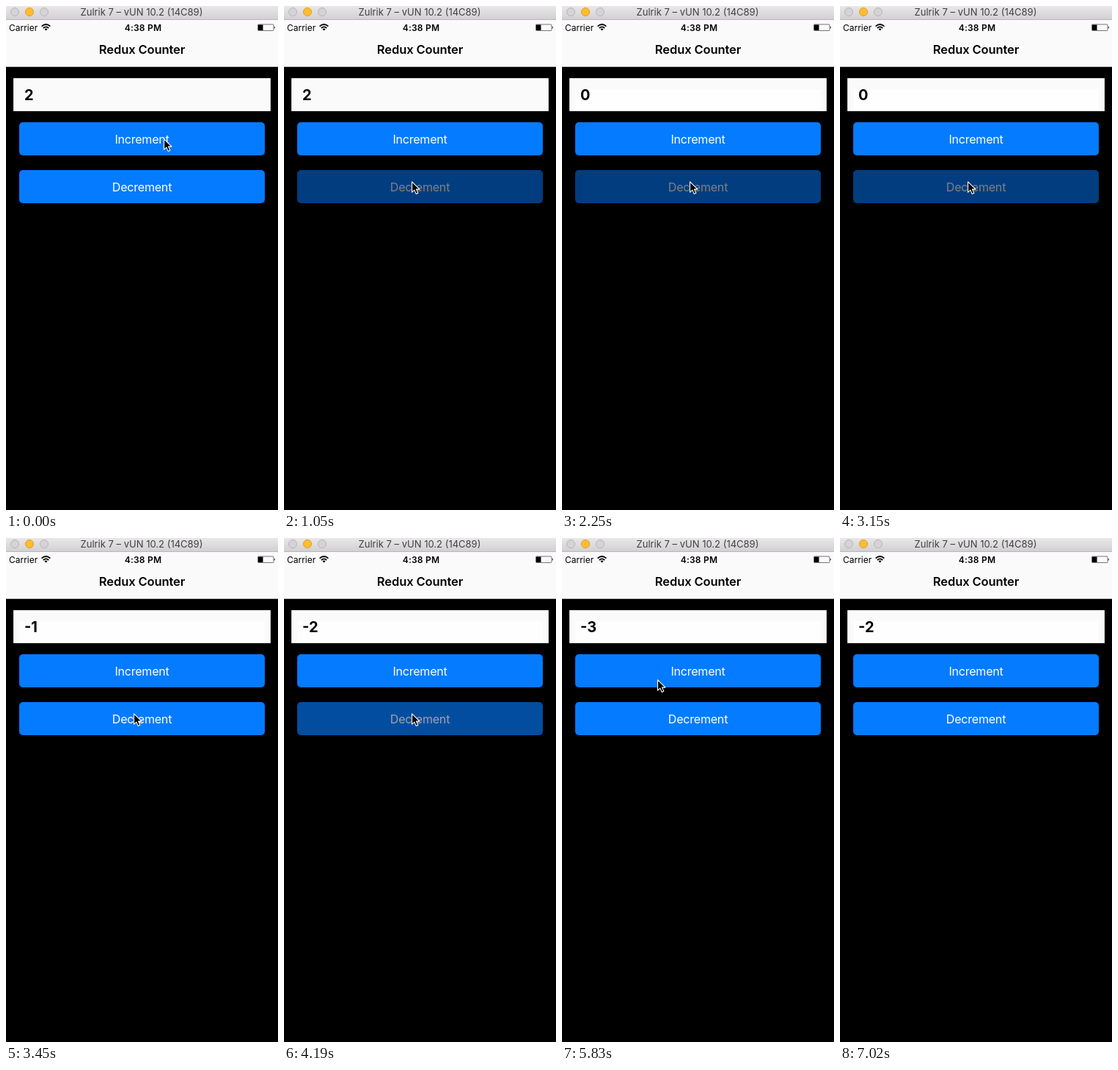
Recreate the animation shown at these times as an HTML page. Size 371x685 px, loop 7.32 s.

```html
<!DOCTYPE html>
<html lang="en">
<head>
<meta charset="utf-8">
<title>Redux Counter</title>
<style>
  html, body { margin: 0; width: 100%; height: 100%; overflow: hidden; background: #000; }
  svg { display: block; width: 371px; height: 685px; font-family: Inter, "Open Sans", sans-serif; }
  .mid { text-anchor: middle; }
  .label { font-size: 16px; letter-spacing: -.2px; fill: #fff; text-anchor: middle; }
</style>
</head>
<body>
<svg viewBox="0 0 371 685">
  <defs>
    <linearGradient id="chrome" x2="0" y2="1">
      <stop stop-color="#e9e7e9"/>
      <stop offset="1" stop-color="#d2d0d2"/>
    </linearGradient>
  </defs>
  <rect width="371" height="685"/>

  <rect width="371" height="18" fill="url(#chrome)"/>
  <rect y="18" width="371" height="1" fill="#b9b7b9"/>
  <g stroke-width="1">
    <circle cx="12" cy="8" r="5.5" fill="#d5d3d6" stroke="#b7b5b8"/>
    <circle cx="32" cy="8" r="5.5" fill="#fdbd2f" stroke="#dfa023"/>
    <circle cx="52" cy="8" r="5.5" fill="#d5d3d6" stroke="#b7b5b8"/>
  </g>
  <text class="mid" x="185" y="13" font-size="13" fill="#414041">Zulrik 7 – vUN 10.2 (14C89)</text>

  <rect y="19" width="371" height="63" fill="#fafafa"/>
  <rect y="82" width="371" height="1" fill="#b2b2b2"/>
  <text x="4" y="33.5" font-size="12">Carrier</text>
  <g fill="none" stroke="#000" stroke-width="1.7">
    <path d="M48.6 27.6Q54.5 22.4 60.4 27.6M50.8 30Q54.5 26.7 58.2 30"/>
    <path d="M54.5 33.4L52.5 31.4Q54.5 29.8 56.5 31.4Z" fill="#000" stroke="none"/>
  </g>
  <text class="mid" x="187" y="33.5" font-size="12" font-weight="600" letter-spacing=".2">4:38 PM</text>
  <rect x="343.5" y="25" width="21.5" height="8.5" rx="1" fill="none" stroke="#555" stroke-width=".8"/>
  <rect x="344" y="25.5" width="6.5" height="7.5"/>
  <path d="M365.8 27.5q2 1.7 0 3.5z"/>
  <text class="mid" x="185.5" y="64.5" font-size="16.5" font-weight="600" letter-spacing="-.1">Redux Counter</text>

  <rect x="10" y="98" width="351" height="45" rx="1" fill="#fafafa"/>
  <rect x="10.5" y="98.5" width="350" height="44" rx="1" fill="none" stroke="#e6e9e8"/>
  <rect id="glow" x="18" y="113" width="335" height="28" fill="#fefefe"/>
  <text id="count" x="25" y="128" font-size="20" font-weight="700"></text>

  <g id="inc">
    <rect x="18" y="158" width="335" height="45" rx="5" fill="#057bff"/>
    <text class="label" x="185.5" y="187">Increment</text>
  </g>
  <g id="dec">
    <rect x="18" y="223" width="335" height="45" rx="5" fill="#057bff"/>
    <text class="label" x="185.5" y="252">Decrement</text>
  </g>
  <path id="cursor" d="M.5 .8V15.2L3.9 12.1L6.2 17.4L8.8 16.3L6.5 11.1H11Z"
        stroke="#fff" stroke-width="1.1" stroke-linejoin="round"/>
</svg>
<script>
const LOOP = 7320;
const el = id => document.getElementById(id);
const [glow, count, inc, dec, cursor] = ['glow', 'count', 'inc', 'dec', 'cursor'].map(el);

// Screen recording: each step holds until the next one.
const steps = [
  { t: 0, n: 2, inc: 1, dec: 1, pos: [215, 180] },
  { t: 300, pos: [202, 199] },
  { t: 450, pos: [181, 229] },
  { t: 600, pos: [174, 238] },
  { t: 1050, dec: .5 },
  { t: 1200, n: 1, dec: .65 },
  { t: 1350, dec: 1 },
  { t: 2250, n: 0, dec: .5 },
  { t: 2400, dec: .8 },
  { t: 2550, dec: 1 },
  { t: 3150, dec: .5 },
  { t: 3300, n: -1, dec: .65 },
  { t: 3450, dec: 1 },
  { t: 4190, n: -2, dec: .63 },
  { t: 4340, dec: 1 },
  { t: 4940, dec: .5 },
  { t: 5090, n: -3, dec: .65 },
  { t: 5240, dec: 1 },
  { t: 5540, pos: [166, 229] },
  { t: 5690, pos: [138, 201] },
  { t: 5830, pos: [130, 192] },
  { t: 6130, inc: .5 },
  { t: 6280, n: -2, inc: .65 },
  { t: 6430, inc: 1 },
  { t: 6580, pos: [180, 258] },
  { t: 6730, pos: [283, 450] },
  { t: 6880, pos: [354, 667] },
  { t: 7020, pos: [380, 700] }
];

function draw(time) {
  const s = Object.assign({}, ...steps.filter(step => step.t <= time));
  count.textContent = s.n;
  glow.setAttribute('opacity', s.n < 2 ? 1 : 0);
  inc.setAttribute('opacity', s.inc);
  dec.setAttribute('opacity', s.dec);
  cursor.setAttribute('transform', `translate(${s.pos})`);
}

const start = performance.now();
function tick() {
  draw((performance.now() - start) % LOOP);
  requestAnimationFrame(tick);
}
tick();
</script>
</body>
</html>
```
